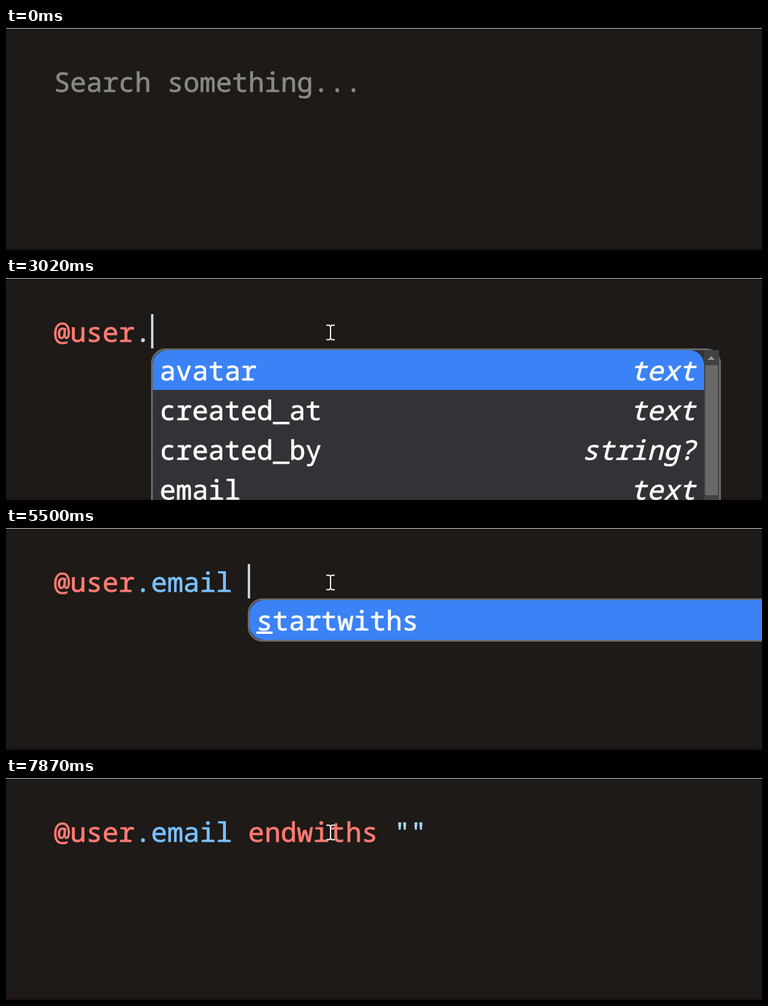
Write an HTML page that moves like this. It is 1251 by 369 pixels and loops after 8000 ms.

```html
<!DOCTYPE html>
<html lang="en">
<head>
<meta charset="utf-8">
<title>Search autocomplete</title>
<style>
  html, body { margin: 0; width: 100%; height: 100%; overflow: hidden; background: #1e1a17; }
  svg { display: block; width: 100%; height: 100%; }
  text {
    font: 44.683px "Noto Sans Mono", "DejaVu Sans Mono", monospace;
    font-variant-ligatures: none;
    text-rendering: geometricPrecision;
    stroke-width: .8px;
  }
  .type { font-style: italic; text-anchor: end; }
</style>
</head>
<body>
<svg viewBox="0 0 1251 369" preserveAspectRatio="none">
  <rect width="1251" height="369" fill="#1e1a17"/>
  <rect width="1251" height="1" fill="#d5d7d6"/>
  <rect y="365" width="1251" height="4" fill="#1a0c12" opacity=".55"/>
  <g id="stage"></g>
  <path id="mouse" d="M-7-12h5l2 2l2-2h5M0-10V10M-7 12h5l2-2l2 2h5"
        fill="none" stroke="#fff" stroke-width="2"/>
</svg>
<script>
const LOOP = 8000;
const LEFT = 79.15, ADVANCE = 26.81, BASELINE = 106;
const POPUP = { top: 117, width: 943, row: 66, border: 3, pad: 11, bar: 25 };
const COLOR = {
  plain: '#c9d1d9', hint: '#888885', keyword: '#ff7b72', field: '#79c0ff', string: '#a5d6ff',
  accent: '#3b82f6', panel: '#333237', border: '#696969', track: '#424242', thumb: '#686868'
};

const FIELDS = [['avatar', 'text'], ['created_at', 'text'], ['created_by', 'string?'], ['email', 'text']];
const user = n => ({ x: 106, items: [['user', '']], match: n });
const fields = { x: 240, items: FIELDS, match: 0, scroll: true };
const email = n => ({ x: 240, items: [FIELDS[3]], match: n });
const starts = { x: 400, items: [['startwiths', '']], match: 1 };
const ends = n => ({ x: 400, items: [['endwiths', '']], match: n });

// start time, input text, caret visible, popup
const STEPS = [
  [0, '', false],
  [1910, '', true],
  [2110, '@', true],
  [2210, '@', true, user(0)],
  [2410, '@u', true, user(0)],
  [2490, '@u', true, user(1)],
  [2570, '@us', true, user(1)],
  [2650, '@us', true, user(2)],
  [2740, '@use', true, user(2)],
  [2830, '@user', true],
  [2920, '@user.', true],
  [3020, '@user.', true, fields],
  [3520, '@user.', false, fields],
  [3860, '@user.e', true, fields],
  [3950, '@user.em', true, email(1)],
  [4090, '@user.em', true, email(2)],
  [4320, '@user.email', true],
  [4530, '@user.email ', true],
  [5130, '@user.email ', false],
  [5250, '@user.email s', true],
  [5360, '@user.email s', true, starts],
  [5500, '@user.email ', true, starts],
  [5610, '@user.email ', true],
  [5720, '@user.email e', true],
  [5830, '@user.email e', true, ends(1)],
  [5990, '@user.email en', true, ends(1)],
  [6060, '@user.email en', true, ends(2)],
  [6130, '@user.email end', true, ends(2)],
  [6200, '@user.email end', true, ends(3)],
  [6270, '@user.email endwiths', true],
  [6470, '@user.email endwiths ', true],
  [7070, '@user.email endwiths ', false],
  [7270, '@user.email endwiths ""', true],
  [7870, '@user.email endwiths ""', false]
];

const label = (x, y, color, s, cls = '') =>
  `<text x="${x}" y="${y}" fill="${color}" stroke="${color}" class="${cls}">${s}</text>`;
const rect = (x, y, w, h, fill, extra = '') =>
  `<rect x="${x}" y="${y}" width="${w}" height="${h}" fill="${fill}" ${extra}/>`;

function tokenColor(s) {
  if (s === '@user' || s === 'endwiths') return COLOR.keyword;
  if (s[0] === '"') return COLOR.string;
  return s[0] === '.' && s.length > 1 ? COLOR.field : COLOR.plain;
}

function drawInput(text) {
  if (!text) return label(LEFT, BASELINE, COLOR.hint, 'Search something...');
  return [...text.matchAll(/@user\b|\.[a-z]+|\S[a-z"]*/g)]
    .map(m => label(LEFT + m.index * ADVANCE, BASELINE, tokenColor(m[0]), m[0]))
    .join('');
}

function drawCaret(text) {
  const pos = text.endsWith('"') ? text.length - 1 : text.length;
  return rect(Math.floor(LEFT + pos * ADVANCE), 60, 4, 57, COLOR.plain);
}

function drawScrollbar(right, top) {
  const x = right - POPUP.bar;
  return rect(x, top, POPUP.bar, 260, COLOR.track) +
    rect(x + 2, top + 25, 21, 216, COLOR.thumb) +
    `<path d="M${x + 6} ${top + 16}l6-6l6 6z" fill="#999"/>`;
}

function drawPopup({ x, items, match, scroll }) {
  const { top, width, row, border, pad, bar } = POPUP;
  const inX = x + border, inY = top + border, right = x + width - border;
  const end = scroll ? right - bar : right;
  const w = end - inX, textX = inX + pad + .3;
  const height = scroll ? 400 : row + 2 * border;
  let out = rect(x + 1.5, top + 1.5, width - 3, height - 3, COLOR.panel,
    `rx="23" stroke="${COLOR.border}" stroke-width="3"`);
  out += scroll
    ? `<path d="M${inX} ${inY + row}v${24 - row}a24 24 0 0 1 24-24h${w - 48}a24 24 0 0 1 24 24v${row - 24}z" fill="${COLOR.accent}"/>`
    : rect(inX, inY, w, row, COLOR.accent, 'rx="24"');
  items.forEach(([name, type], i) => {
    const y = inY + i * row + 50;
    out += label(textX, y, '#fff', name) + label(end - pad - 3, y, '#fff', type, 'type');
  });
  if (match) out += rect(textX, 172, match * ADVANCE, 4, '#fff');
  if (scroll) out += drawScrollbar(right, inY);
  return out;
}

function mouseAt(t) {
  const p = Math.min(1, Math.floor((t - 1460) / 45) / 9);
  const rest = (1 - p) ** 2;
  return [537 + 278 * rest, 90.5 + 268 * rest];
}

const stage = document.getElementById('stage');
const mouse = document.getElementById('mouse');
let shown;

function render(t) {
  const step = STEPS.findLast(s => s[0] <= t);
  if (step !== shown) {
    const [, text, caret, popup] = shown = step;
    stage.innerHTML = drawInput(text) + (popup ? drawPopup(popup) : '') + (caret ? drawCaret(text) : '');
  }
  mouse.style.display = t < 1460 ? 'none' : '';
  mouse.setAttribute('transform', `translate(${mouseAt(Math.max(t, 1460))})`);
}

const start = performance.now();
function tick() {
  render((performance.now() - start) % LOOP);
  requestAnimationFrame(tick);
}
tick();
</script>
</body>
</html>
```
